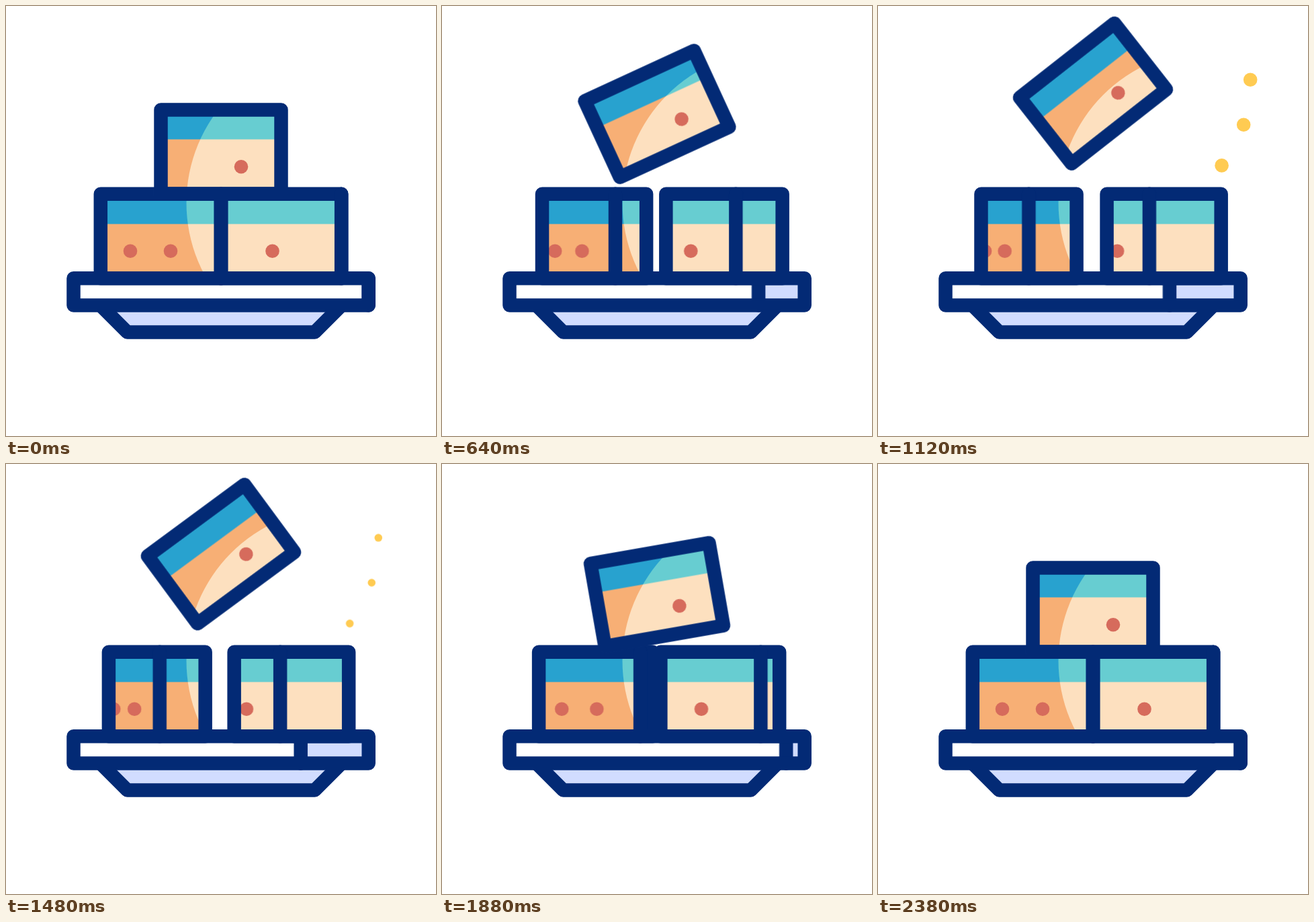
An HTML page without scripts that plays this animation: 640 px wide and 640 px high, repeating every 2.4 s.

```html
<!DOCTYPE html>
<html lang="en">
<head>
<meta charset="utf-8">
<title>Cakes on a plate</title>
<style>
  html, body { margin: 0; width: 100%; height: 100%; overflow: hidden; background: #fff; }
  svg { display: block; width: 100vw; height: 100vh; }

  .line { fill: none; stroke: #032a75; stroke-width: 20.5; stroke-linecap: round; stroke-linejoin: round; }
  .lavender { fill: #d1dcff; }
  .dot { fill: #d66b5c; }
  .spark { fill: #ffcb52; }
  .dark .body { fill: #f7af75; }
  .dark .icing { fill: #28a2cf; }
  .light .body { fill: #fde0bf; }
  .light .icing { fill: #67cdd1; }

  .lift, .slide, .left, .right, .side {
    animation: 2400ms cubic-bezier(.76, 0, .24, 1) -5ms infinite;
  }
  .lift { animation-name: lift; transform-origin: 320px 217px; }
  .slide { animation-name: slide; }
  .left, .right, .side { animation-name: resize; }
  .left { --x: 153.5px; --w: 142px; }
  .right { --x: 340.6px; --w: 170.1px; }
  .side { --x: 433.7px; --w: 106px; }
  .spark {
    transform-box: fill-box; transform-origin: center;
    animation: pop 2400ms ease-in-out infinite;
  }

  @keyframes lift {
    0%, 100% { transform: translateY(0) rotate(0deg); }
    50% { transform: translateY(-87px) rotate(-38.2deg); }
  }
  @keyframes slide {
    0%, 100% { transform: translateX(0); }
    50% { transform: translateX(var(--dx)); }
  }
  @keyframes resize {
    50% { x: var(--x); width: var(--w); }
  }
  @keyframes pop {
    0%, 34%, 66%, 100% { transform: scale(0); }
    42%, 58% { transform: scale(1); }
  }
</style>
</head>
<body>
<svg viewBox="0 0 640 640">
  <clipPath id="shine"><circle cx="495.5" cy="293" r="227"/></clipPath>

  <!-- plate -->
  <path class="lavender" d="M140.5 445.5l40 40h279l40-40z"/>
  <path class="line" d="M140.5 445.5l40 40h279l40-40"/>
  <rect fill="#fff" x="100.5" y="405.2" width="439.2" height="40.3"/>
  <rect class="lavender side" x="539.7" y="405.2" width="0" height="40.3"/>

  <!-- cake fills: shaded, then lit inside the circle -->
  <g class="dark">
    <rect class="body left" x="140.8" y="279.7" width="179.2" height="125.5"/>
    <rect class="icing left" x="140.8" y="279.7" width="179.2" height="44.8"/>
    <g class="lift">
      <rect class="body" x="230.5" y="154.5" width="179" height="125"/>
      <rect class="icing" x="230.5" y="154.5" width="179" height="44"/>
    </g>
  </g>
  <g class="light" clip-path="url(#shine)">
    <rect class="body left" x="140.8" y="279.7" width="179.2" height="125.5"/>
    <rect class="icing left" x="140.8" y="279.7" width="179.2" height="44.8"/>
    <rect class="body right" x="320" y="279.7" width="179.2" height="125.5"/>
    <rect class="icing right" x="320" y="279.7" width="179.2" height="44.8"/>
    <g class="lift">
      <rect class="body" x="230.5" y="154.5" width="179" height="125"/>
      <rect class="icing" x="230.5" y="154.5" width="179" height="44"/>
    </g>
  </g>

  <g class="dot">
    <circle class="slide" style="--dx:-26px" cx="185" cy="364.7" r="10.3"/>
    <circle class="slide" style="--dx:-56.5px" cx="245" cy="364.7" r="10.3"/>
    <circle class="slide" style="--dx:-40.5px" cx="396.5" cy="364.7" r="10.3"/>
  </g>

  <!-- outlines -->
  <g class="line">
    <rect class="left" x="140.8" y="279.7" width="179.2" height="125.5"/>
    <rect class="right" x="320" y="279.7" width="179.2" height="125.5"/>
    <path class="slide" style="--dx:-95.8px" d="M320 279.7v125.5"/>
    <path class="slide" style="--dx:-95.6px" d="M499.2 279.7v125.5"/>
    <path class="slide" style="--dx:-106px" d="M539.7 405.2v40.3"/>
    <rect x="100.5" y="405.2" width="439.2" height="40.3"/>
  </g>

  <g class="lift">
    <circle class="dot" cx="350" cy="239.2" r="10.3"/>
    <rect class="line" x="230.5" y="154.5" width="179" height="125"/>
  </g>

  <circle class="spark" cx="554.2" cy="109.8" r="10.3"/>
  <circle class="spark" cx="544.2" cy="176.7" r="10.3"/>
  <circle class="spark" cx="511.6" cy="237.4" r="10.3"/>
</svg>
</body>
</html>
```
